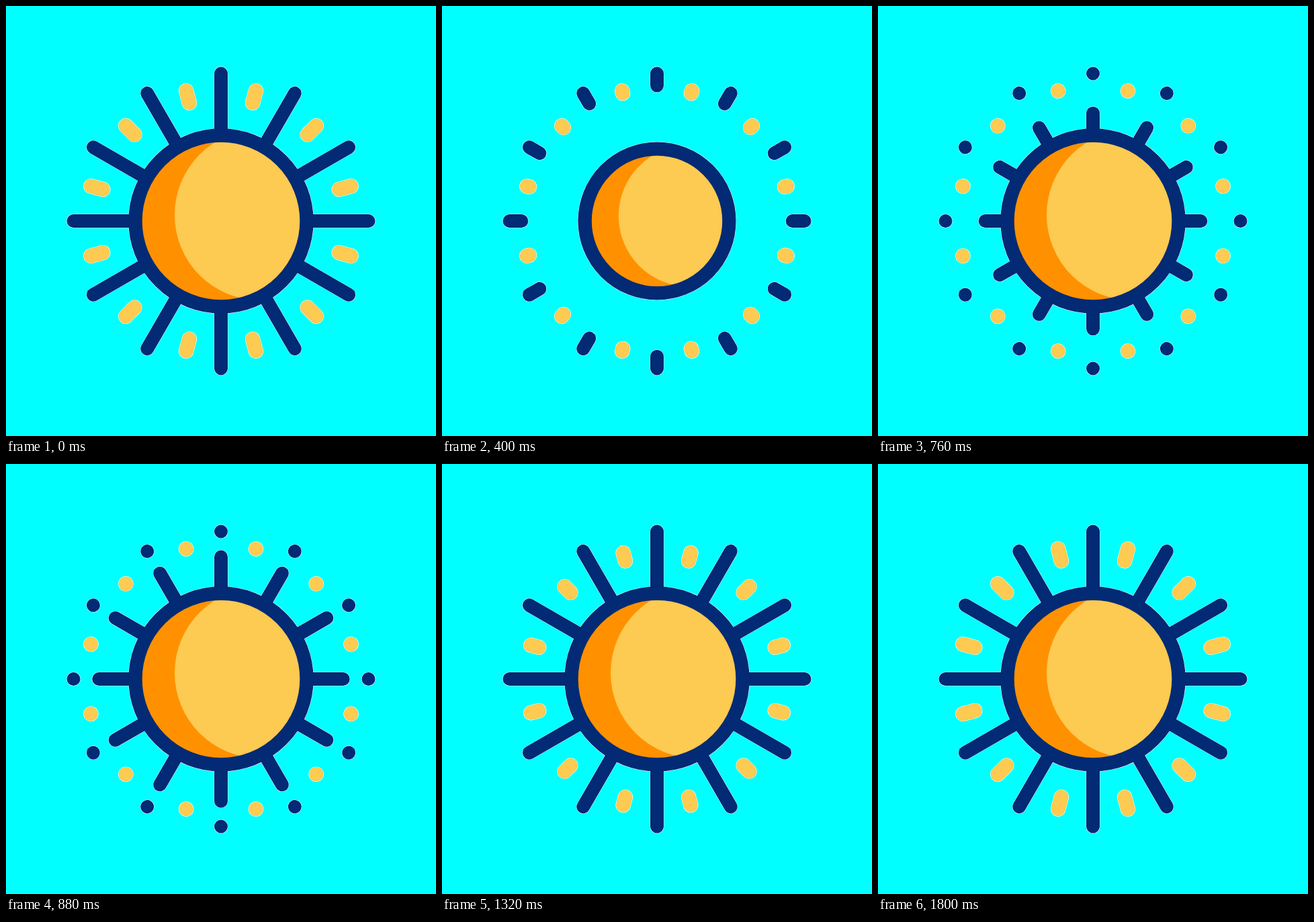
An HTML page with a canvas for the animation above (2400 ms loop, 640 by 640 pixels).

```html
<!DOCTYPE html>
<html lang="en">
<head>
<meta charset="utf-8">
<title>Sun</title>
<style>
html, body { margin: 0; width: 100%; height: 100%; overflow: hidden; background: #0ff; }
canvas { display: block; }
</style>
</head>
<body>
<canvas id="stage" width="640" height="640"></canvas>
<script>
const ctx = document.getElementById('stage').getContext('2d');
const NAVY = '#032a74', YELLOW = '#fdca52', ORANGE = '#ff9100';
const LOOP = 2400, STEP = 40, SWAP = 960;
const RAY = { color: NAVY, width: 20, inner: 129.5, outer: 219.5, turn: 0, show: 465, grow: 465, end: 1215 };
const DASH = { color: YELLOW, width: 21.5, inner: 182, outer: 200.4, turn: Math.PI / 12, show: SWAP, grow: 1000, end: 1520 };

// Eased progress from 0 to 1 between two times
function ease(t, from, to) {
  const s = Math.min(1, Math.max(0, (t - from) / (to - from)));
  return s * s * (3 - 2 * s);
}

const mix = (a, b, p) => a + (b - a) * p;

function disc(x, y, r) {
  ctx.beginPath();
  ctx.arc(x, y, r, 0, 2 * Math.PI);
}

function spokes(kind, from, to, halo) {
  ctx.beginPath();
  for (let i = 0; i < 12; i++) {
    const a = kind.turn + i * Math.PI / 6;
    const x = Math.cos(a), y = Math.sin(a);
    ctx.moveTo(x * from, y * from);
    ctx.lineTo(x * to + x * 0.01, y * to + y * 0.01);
  }
  ctx.strokeStyle = halo ? '#fff' : kind.color;
  ctx.lineWidth = kind.width + (halo ? 1 : 0);
  ctx.stroke();
}

// The old spokes shrink to outer dots, the new ones grow from the inner end
function burst(kind, t, halo) {
  const { inner, outer } = kind;
  if (t < SWAP) spokes(kind, mix(inner, outer, ease(t, 0, 560)), outer, halo);
  if (t >= kind.show) spokes(kind, inner, mix(inner, outer, ease(t, kind.grow, kind.end)), halo);
}

function ball(radius) {
  const k = (radius - 10) / 117.5;
  ctx.save();
  disc(0, 0, radius);
  ctx.clip();
  ctx.fillStyle = ORANGE;
  ctx.fill();
  disc(58 * k, -9.1 * k, 127 * k);
  ctx.fillStyle = YELLOW;
  ctx.fill();
  ctx.restore();
  disc(0, 0, radius);
  ctx.strokeStyle = NAVY;
  ctx.lineWidth = 20.4;
  ctx.stroke();
}

function draw(now) {
  const t = Math.floor(now % LOOP / STEP) * STEP;
  const radius = 127.5 - 30 * (ease(t, 0, 300) - ease(t, 300, 560));
  ctx.setTransform(1, 0, 0, 1, 0, 0);
  ctx.fillStyle = '#0ff';
  ctx.fillRect(0, 0, 640, 640);
  ctx.translate(320, 320);
  ctx.lineCap = 'round';
  for (const halo of [true, false]) {
    if (halo) {
      disc(0, 0, radius + 10.7);
      ctx.fillStyle = '#fff';
      ctx.fill();
    }
    burst(RAY, t, halo);
    burst(DASH, t, halo);
  }
  ball(radius);
}

function tick() {
  draw(performance.now());
  requestAnimationFrame(tick);
}
tick();
</script>
</body>
</html>
```
